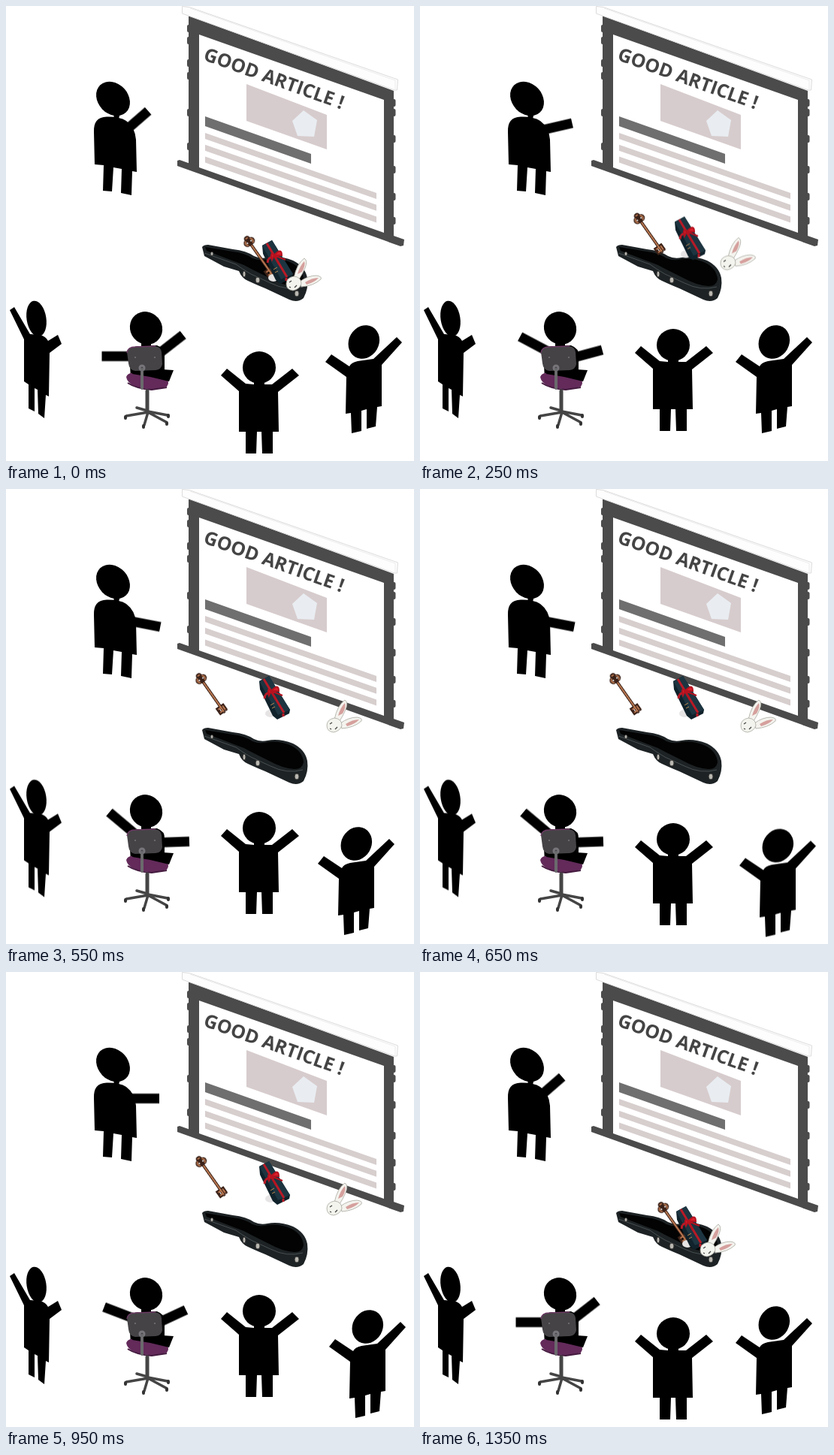
Write an HTML page that moves like this. It is 543x606 px and loops after 1.4 s.

```html
<!DOCTYPE html>
<html lang="en">
<head>
<meta charset="utf-8">
<title>Good article</title>
<style>
html, body { margin: 0; width: 100%; height: 100%; overflow: hidden; background: #fff; }
svg { display: block; width: 543px; height: 606px; }
.title { font: 700 24.9px "Open Sans", "Noto Sans", sans-serif; fill: #444; }

/* 28 poses of 50 ms: each segment is cut into steps, the rest are holds */
.move { animation: 1400ms steps(1) infinite; }
#pointer { animation-name: pointer; }
#armL { animation-name: armL; }
#armR { animation-name: armR; }
#key { animation-name: key; }
#gift { animation-name: gift; }
#rabbit { animation-name: rabbit; }
#slim { animation-name: slim; }
#hopper { animation-name: hopper; }
#dancer { animation-name: dancer; }

@keyframes pointer {
  0% { transform: translate(159px, 166px) rotate(-41deg); animation-timing-function: steps(5); }
  17.857% { transform: translate(163.5px, 165px) rotate(-13deg); animation-timing-function: steps(4); }
  32.142%, 60.714% { transform: translate(166px, 176px) rotate(11deg); }
  60.714% { animation-timing-function: steps(2); }
  67.857% { transform: translate(164px, 168.5px) rotate(0deg); animation-timing-function: steps(4); }
  82.142% { transform: translate(163.7px, 166px) rotate(-19deg); animation-timing-function: steps(4); }
  96.428%, 100% { transform: translate(159px, 166px) rotate(-41deg); }
}
@keyframes armL {
  0% { transform: translate(171.5px, 466.5px) rotate(0deg); animation-timing-function: steps(5); }
  17.857% { transform: translate(172px, 461px) rotate(28deg); animation-timing-function: steps(3); }
  28.571%, 57.142% { transform: translate(171.2px, 459px) rotate(40deg); }
  57.142% { animation-timing-function: steps(3); }
  67.857% { transform: translate(171.6px, 462px) rotate(21deg); animation-timing-function: steps(4); }
  82.142%, 100% { transform: translate(171.5px, 466.5px) rotate(0deg); }
}
@keyframes armR {
  0% { transform: translate(201px, 465px) rotate(-38deg); animation-timing-function: steps(5); }
  17.857% { transform: translate(200px, 469.5px) rotate(-15deg); animation-timing-function: steps(3); }
  28.571%, 57.142% { transform: translate(200px, 471px) rotate(-2deg); }
  57.142% { animation-timing-function: steps(3); }
  67.857% { transform: translate(199.6px, 468.6px) rotate(-25deg); animation-timing-function: steps(4); }
  82.142%, 100% { transform: translate(201px, 465px) rotate(-38deg); }
}
@keyframes key {
  0% { transform: translate(64px, 61px); animation-timing-function: steps(10); }
  35.714%, 67.857% { transform: translate(0, 0); }
  67.857% { animation-timing-function: steps(4); }
  82.142% { transform: translate(56px, 54px); }
  85.714%, 100% { transform: translate(64px, 61px); }
}
@keyframes gift {
  0% { transform: translate(4px, 63px); animation-timing-function: steps(10); }
  35.714%, 64.285% { transform: translate(0, 0); }
  67.857% { transform: translate(0, 3px); animation-timing-function: steps(4); }
  82.142% { transform: translate(3px, 56px); }
  85.714%, 100% { transform: translate(4px, 63px); }
}
@keyframes rabbit {
  0% { transform: translate(-54px, 55px); animation-timing-function: steps(10); }
  35.714%, 67.857% { transform: translate(0, 0); }
  67.857% { animation-timing-function: steps(4); }
  82.142% { transform: translate(-47px, 49px); }
  85.714%, 100% { transform: translate(-54px, 55px); }
}
@keyframes slim {
  0%, 25% { transform: translateY(0); }
  25% { animation-timing-function: steps(3); }
  35.714%, 39.285% { transform: translateY(-5.5px); }
  39.285% { animation-timing-function: steps(3); }
  50%, 100% { transform: translateY(0); }
}
@keyframes hopper {
  0% { transform: translateY(0); animation-timing-function: steps(4); }
  14.285%, 17.857% { transform: translateY(-30px); }
  17.857% { animation-timing-function: steps(3); }
  28.571% { transform: translateY(0); animation-timing-function: steps(3); }
  39.285% { transform: translateY(-30px); animation-timing-function: steps(4); }
  53.571% { transform: translateY(0); animation-timing-function: steps(4); }
  67.857% { transform: translateY(-30px); animation-timing-function: steps(4); }
  82.142% { transform: translateY(-5px); }
  85.714%, 100% { transform: translateY(0); }
}
@keyframes dancer {
  0% { transform: translate(0, 0); animation-timing-function: steps(2); }
  7.142% { transform: translate(10px, 10px); animation-timing-function: steps(3); }
  17.857% { transform: translate(-5px, 0); animation-timing-function: steps(3); }
  28.571% { transform: translate(-20px, 20px); }
  32.142% { transform: translate(-20px, 30px); animation-timing-function: steps(2); }
  39.285% { transform: translate(-10px, 25px); animation-timing-function: steps(4); }
  53.571% { transform: translate(10px, 30px); animation-timing-function: steps(3); }
  64.285% { transform: translate(10px, 22px); }
  67.857% { transform: translate(5px, 25px); animation-timing-function: steps(4); }
  82.142% { transform: translate(-15px, 30px); }
  85.714% { transform: translate(-20px, 27px); animation-timing-function: steps(3); }
  96.428% { transform: translate(-5px, 20px); }
  100% { transform: translate(0, 0); }
}
</style>
</head>
<body>
<svg viewBox="0 0 543 606">
  <!-- projection screen -->
  <g fill="#4b4b4b">
    <path d="M243 13 516 113V310L243 211Z"/>
    <path d="M228 206 231 205 530 311 529 319 525 320 228 213Z"/>
    <path d="M243 27v6M243 43v6M243 73v6M243 90v6M243 139v6M243 184v6M516.500 126v6M516.500 139v6M516.500 174v6M516.500 215v6M516.500 251v6M516.500 283v6" stroke="#4b4b4b" stroke-width="4" stroke-linecap="round"/>
  </g>
  <path d="M257 38 503 125V302L257 215Z" fill="#fff"/>
  <path d="M234.5.5 244 1.5 521.500 98 520.500 112 517 112 234.500 10Z" fill="#fdfdfd" stroke="#dcdcdc"/>
  <path d="M245 3 518 99V111" fill="none" stroke="#ececec"/>
  <text class="title" transform="translate(261.500 71.500) rotate(19.700)">GOOD ARTICLE !</text>
  <path d="M320 104 427 145V191L320 153Z" fill="#d7cccd"/>
  <path d="M396 139 414 152 410 174 388 173 381 153Z" fill="#e9edf2"/>
  <path d="M265 147 406 197V210L265 160Z" fill="#6f6f6f"/>
  <g fill="#d7cece">
    <path id="line" d="M265 169 493 249V257L265 177Z"/>
    <use href="#line" y="15.700"/>
    <use href="#line" y="31.400"/>
  </g>

  <!-- speaker -->
  <ellipse rx="20" ry="25" transform="translate(142.500 123.500) rotate(-43)"/>
  <path d="M143 143 152 143 150 150 144 150Z"/>
  <path d="M117 168Q116 148 134 147.500 151 147 160 153 172 162 173 178L174 221 168 220 167 252 153 249 154 217 143 215 141 247 129 246 130 212 118 211Z"/>
  <rect id="pointer" class="move" y="-6.500" width="40" height="13"/>

  <!-- instrument case -->
  <path d="M261 321Q263 318 269 318L302 324Q320 326 330 333 338 337 348 335 364 332 382 339 398 347 401 362 403 376 396 389 388 396 377 391L345 376Q335 372 322 366 314 363 310 353L290 347 264 333Z" fill="#1d2224"/>
  <path d="M265 321 302 327Q318 329 328 336 338 340 348 337 364 335 380 342 395 350 396 364 394 374 383 373 368 372 350 362L326 350Q316 344 306 341L267 326Z" fill="#030303"/>
  <path d="M264 329 306 344Q314 350 326 357L352 369Q374 380 395 374" fill="none" stroke="#485052"/>
  <g fill="#b9b7b0" stroke="#333">
    <ellipse cx="274" cy="330" rx="2" ry="2.500"/>
    <ellipse cx="317" cy="357" rx="2" ry="4"/>
    <ellipse cx="335" cy="365" rx="3" ry="4"/>
    <ellipse cx="387" cy="383" rx="3" ry="4"/>
  </g>

  <!-- contents of the case -->
  <g id="key" class="move">
    <g transform="translate(273.500 273) rotate(55)" fill="none" stroke-linecap="round">
      <g stroke="#3a2118" stroke-width="4">
        <path d="M-20 0H29M21 0V5H28V0M21 0V-4H28"/>
        <circle cx="-24" cy="-3" r="3"/>
        <circle cx="-24" cy="3" r="3"/>
        <circle cx="-29" cy="0" r="2"/>
      </g>
      <path d="M-18 0H28M22 1V4M27 1V4M22-3H27M-27-4Q-24-7-21-4M-27 4Q-24 7-21 4M-30-1V1" stroke="#b9774f" stroke-width="1.800"/>
    </g>
  </g>
  <g id="gift" class="move">
    <ellipse cx="352" cy="299" rx="7" ry="5" fill="#e6e4e4"/>
    <path d="M337 256 350 249 378 294 377 299 361 307 355 302 338 267Z" fill="#10222b"/>
    <path d="M337 256 350 249 378 294 362 301Z" fill="#1d3541"/>
    <path d="M343 253 370 298M345 274 361 264M369 299V303M345 274 344 279" fill="none" stroke="#b81a26" stroke-width="3"/>
    <path d="M353 269Q347 263 350 275ZM353 269Q363 258 363 269ZM353 269 368 275M353 269 359 281" fill="#d91f2b" stroke="#b5121f" stroke-width="2"/>
    <path d="M352 288 357 285M354 292 358 290" stroke="#b98a52"/>
  </g>
  <g id="rabbit" class="move" stroke="#a9a9a0" stroke-width=".8">
    <path d="M437 307Q441 288 451 281 456 284 452 294 448 303 444 309Z" fill="#f4f3ee"/>
    <path d="M445 312Q456 304 467 304 475 305 473 309 463 318 447 319Z" fill="#f4f3ee"/>
    <path d="M442 302Q445 291 451 285 453 290 448 299ZM452 313Q461 307 470 307 465 313 454 316Z" fill="#d5a09d" stroke="none"/>
    <path d="M427 315Q427 307 437 305 447 306 447 315 445 322 436 324 427 323 427 315Z" fill="#f4f4ee"/>
    <path d="M431 313 434 311M438 320 441 317M431 319 433 320" stroke="#444" stroke-width="1.300"/>
  </g>

  <!-- slim listener -->
  <g id="slim" class="move">
    <ellipse rx="13" ry="24" transform="translate(40.500 416.500) rotate(-9)"/>
    <path d="M5 405 11 401 32 437 45 438Q53 440 56 446L69 438 74 450 58 462 57 520 53 518 51 549 43 543 42 511 38 509V540L30 536V504L24 500V444Z"/>
  </g>

  <!-- seated listener -->
  <ellipse rx="21" ry="22.500" transform="translate(186.500 429) rotate(-40)"/>
  <path d="M180 448H193V456H180ZM164 462Q165 454 175 453L201 452Q212 456 211 466V486L166 496Z"/>
  <rect id="armL" class="move" x="-44" y="-6.500" width="44" height="13"/>
  <rect id="armR" class="move" y="-6.500" width="44" height="13"/>
  <path d="M160 494Q162 488 172 489L214 496Q218 502 214 507 199 512 180 509 162 505 160 494Z" fill="#632a5a"/>
  <path d="M162 502Q174 510 194 511L214 508" fill="none" stroke="#431a3e" stroke-width="2"/>
  <path d="M168 483 208 484 223 485 217 500 192 494 168 490Z"/>
  <path d="M161 461Q162 454 172 454L199 453Q206 454 207 461L208 477Q207 484 199 485L172 486Q164 485 163 476Z" fill="#454346"/>
  <path d="M161 462Q162 454 172 454L199 453" fill="none" stroke="#6b3a63" stroke-width="1.500"/>
  <g fill="none" stroke="#454545" stroke-linecap="round">
    <circle cx="181" cy="482" r="3" stroke="#77757a" stroke-width="3"/>
    <path d="M181 484V509" stroke="#6a6a6c" stroke-width="4"/>
    <path d="M188 513V541" stroke-width="5"/>
    <path d="M189 541 160 546M189 541 184 558M189 541 213 554M189 540 215 545M188 539 174 535" stroke-width="3.500"/>
    <path d="M159 547V549M183 559V561M214 555V557M216 545V547" stroke="#333" stroke-width="4"/>
  </g>
  <g fill="#77757a"><circle cx="172" cy="468" r="1"/><circle cx="198" cy="468" r="1"/></g>

  <!-- jumping listener -->
  <g id="hopper" class="move">
    <ellipse cx="337" cy="481.500" rx="22" ry="21.500"/>
    <path d="M286 492 294 483 319 503 330 504V500H344V504L354 504 381 483 390 492 362 514 363 567 355 567V596H341L340 567H334L333 596H319V567H310V513Z"/>
  </g>

  <!-- dancing listener -->
  <g id="dancer" class="move">
    <ellipse rx="20" ry="23" transform="translate(476.300 447.500) rotate(30)"/>
    <path d="M425 474 433 464 457 480Q459 475 468 473L489 470 520 441 527 448 500 478 500 533 494 534 492 560 480 563 480 537 473 539 473 566 460 569 459 542 452 543 453 494Z"/>
  </g>
</svg>
</body>
</html>
```
